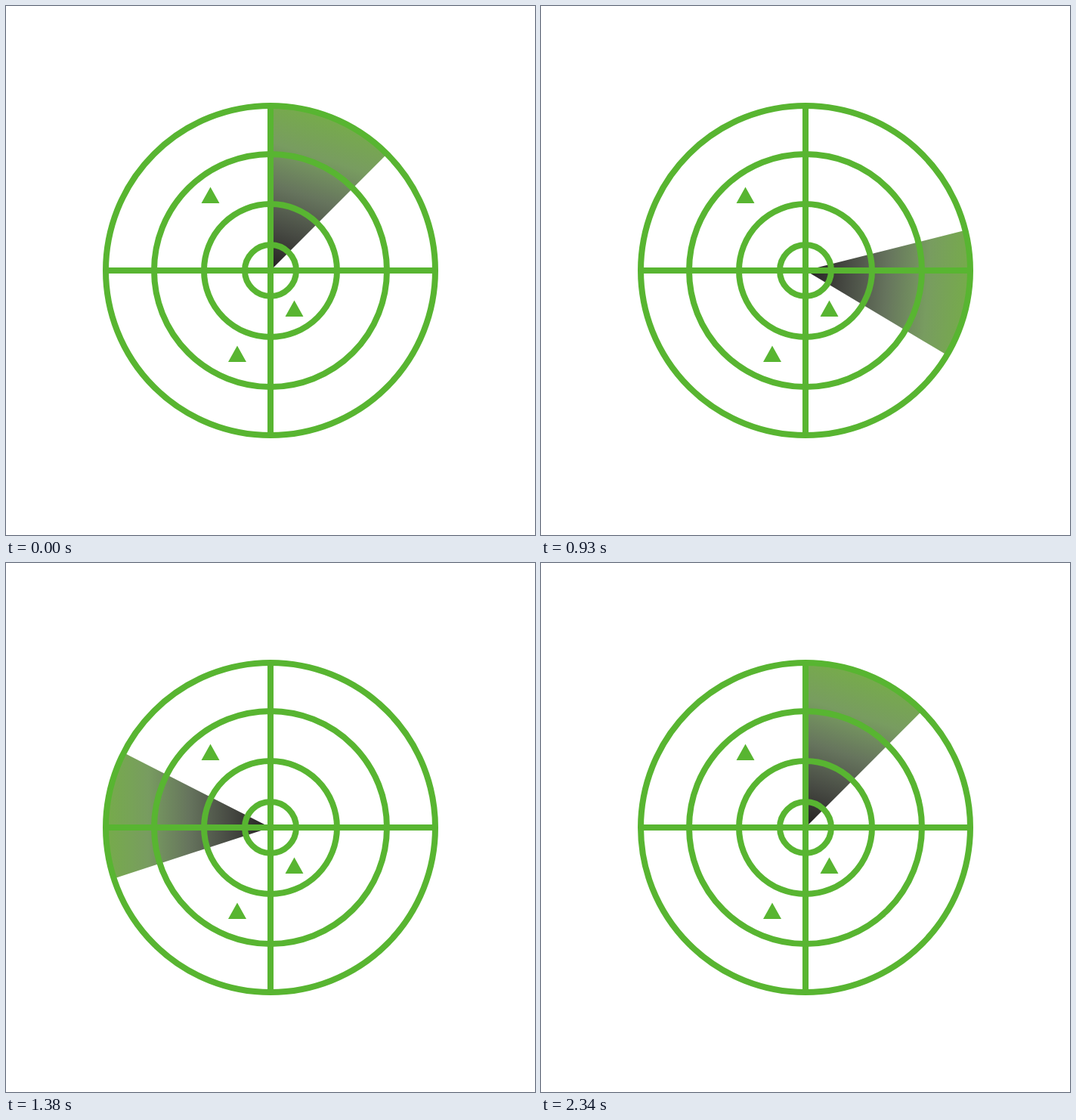
Write an HTML page that moves like this. It is 700 px wide and 700 px high and loops after 2400 ms.

```html
<!DOCTYPE html>
<html lang="en">
<head>
<meta charset="utf-8">
<title>Radar sweep</title>
<style>
  html, body { margin: 0; width: 100%; height: 100%; overflow: hidden; background: #fff; }
  svg { display: block; width: 100%; height: 100%; }
</style>
</head>
<body>
<svg viewBox="-350 -350 700 700">
  <defs>
    <linearGradient id="fade" gradientUnits="userSpaceOnUse" x1="0" y1="0" x2="0" y2="-216" gradientTransform="rotate(18)">
      <stop offset="0" stop-color="#231f20"/>
      <stop offset=".25" stop-color="#474a43"/>
      <stop offset=".5" stop-color="#66745d"/>
      <stop offset=".75" stop-color="#789c60"/>
      <stop offset="1" stop-color="#76ab4b"/>
    </linearGradient>
  </defs>
  <path id="sweep" d="M0 0V-217A217 217 0 0 1 153.4 -153.4Z" fill="url(#fade)"/>
  <g fill="none" stroke="#58b531" stroke-width="8">
    <circle r="218"/>
    <circle r="154"/>
    <circle r="88"/>
    <circle r="34"/>
    <path d="M-218 0H218M0 -218V218"/>
  </g>
  <path fill="#58b531" d="M-79.5 -110.5l12 21.5h-24zM31.5 39.5l12 21.5h-24zM-44 99.5l12 21.5h-24z"/>
</svg>
<script>
  const LOOP = 2400, STEP = 30, LAST = 78;
  const sweep = document.getElementById('sweep');

  // Cubic Bézier easing (0.69, 0, 0.34, 1), solved by bisection.
  function ease(x) {
    const curve = (s, p1, p2) => 3 * (1 - s) ** 2 * s * p1 + 3 * (1 - s) * s * s * p2 + s ** 3;
    let low = 0, high = 1;
    for (let i = 0; i < 30; i++) {
      const mid = (low + high) / 2;
      if (curve(mid, 0.69, 0.34) < x) low = mid; else high = mid;
    }
    return curve(low, 0, 1);
  }

  function draw(now) {
    const step = Math.min(Math.floor(now % LOOP / STEP), LAST);
    sweep.setAttribute('transform', `rotate(${360 * ease(step / (LAST + 1))})`);
    requestAnimationFrame(draw);
  }

  draw(0);
</script>
</body>
</html>
```
